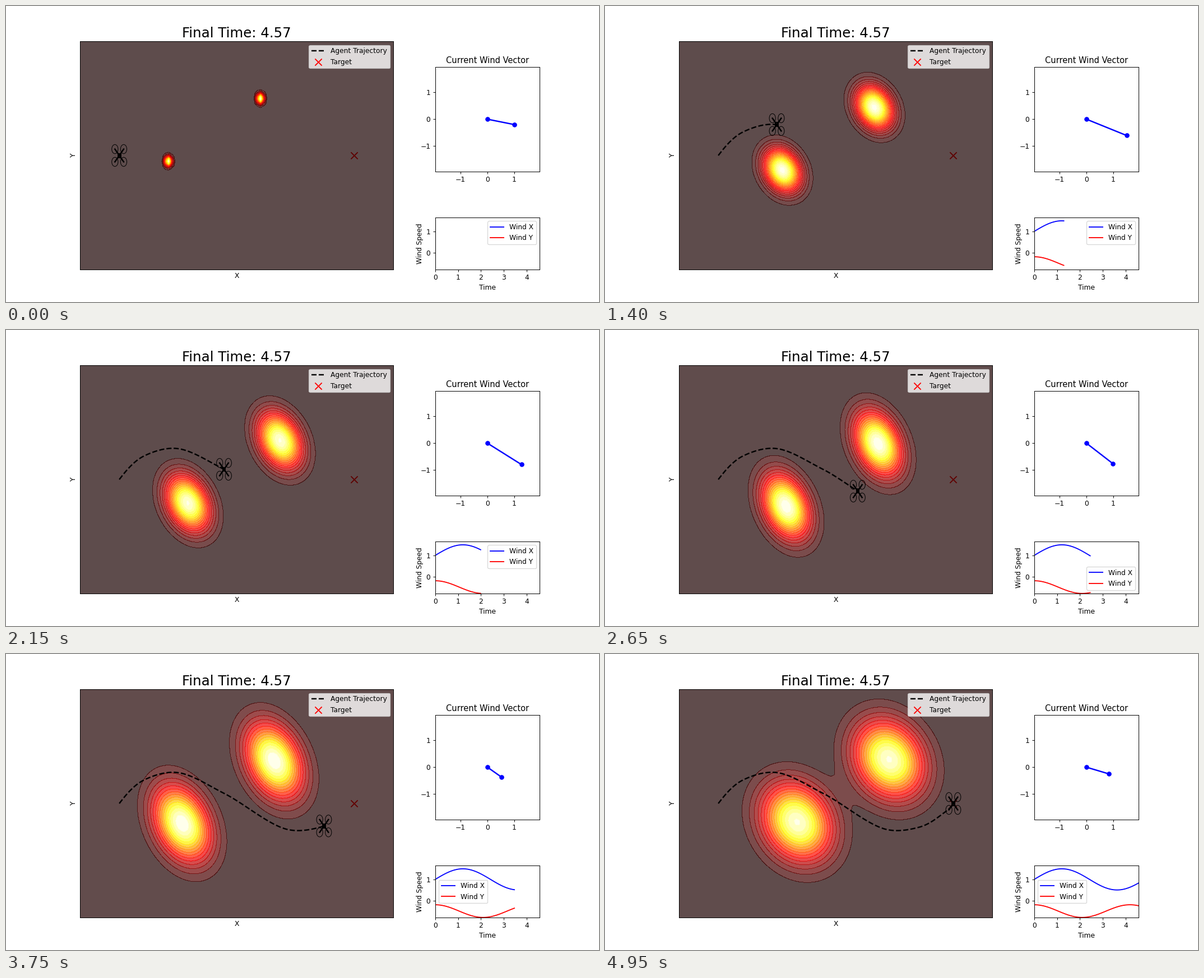
Write a matplotlib script that moves like this. It is 1058 by 529 pixels and loops after 5 s.

```python
import numpy as np
import matplotlib.pyplot as plt
from matplotlib.animation import FuncAnimation
from matplotlib.patches import Circle, Rectangle

plt.rcParams["font.family"] = "DejaVu Sans"

FRAMES, INTERVAL, DPI = 100, 50, 88
FINAL_TIME = 4.57
TIMES = np.linspace(0, FINAL_TIME, FRAMES)
TARGET = (30, 0)
SOURCES = [(6.25, -0.5), (18.0, 5.0)]
ARM, ROTOR, BODY = 0.56, 0.4, 0.34


def wind(t):
    return 1 + 0.5 * np.sin(1.3 * t), -0.5 + 0.3 * np.cos(1.5 * t)


def hermite(t, knots, values, v_start):
    """Smooth curve through the knots with a given starting velocity."""
    knots, values = np.array(knots), np.array(values)
    speed = np.gradient(values, knots, edge_order=2)
    speed[0] = v_start
    i = np.clip(np.searchsorted(knots, t, side="right") - 1, 0, len(knots) - 2)
    h = knots[i + 1] - knots[i]
    s = (t - knots[i]) / h
    return ((1 + 2 * s) * (1 - s) ** 2 * values[i] + s * (1 - s) ** 2 * h * speed[i]
            + s**2 * (3 - 2 * s) * values[i + 1] - s**2 * (1 - s) * h * speed[i + 1])


def density(t):
    """Two puffs carried by the wind, spreading twice as fast along it."""
    wx, wy = wind(t)
    norm = np.hypot(wx, wy)
    c, s = wx / norm, wy / norm
    var_along, var_cross = 0.1 + 2 * t, 0.1 + t
    total = np.zeros_like(GX)
    for x0, y0 in SOURCES:
        dx, dy = GX - x0 - wx * t, GY - y0 - wy * t
        along, cross = c * dx + s * dy, c * dy - s * dx
        total += np.exp(-0.5 * (along**2 / var_along + cross**2 / var_cross))
    return total / (2 * np.pi * np.sqrt(var_along * var_cross))


GX, GY = np.meshgrid(np.linspace(-5, 35, 100), np.linspace(-10, 10, 100))
WX, WY = wind(TIMES)
PATH_X = hermite(TIMES, [0, 0.692, 1.2925, 1.985, 2.862, 3.97, FINAL_TIME],
                 [0, 3.18, 7.47, 13.37, 21.6, 28.8, 30], 3.1)
PATH_Y = hermite(TIMES, [0, 0.692, 1.2925, 1.985, 2.862, 3.39, 3.97, FINAL_TIME],
                 [0, 2.07, 2.71, 0.89, -2.3, -2.08, -0.825, 0], 2.75)

fig = plt.figure(figsize=(1058 / DPI, 529 / DPI), dpi=DPI, facecolor="white")
grid = fig.add_gridspec(2, 2, width_ratios=[3, 1], height_ratios=[3, 1])

# Main map
ax = fig.add_subplot(grid[:, 0])
ax.set(xlim=(-5, 35), ylim=(-10, 10), xticks=[], yticks=[], xlabel="X", ylabel="Y")
ax.set_title(f"Final Time: {FINAL_TIME}", fontsize=20)
trail, = ax.plot([], [], "k--", lw=2, label="Agent Trajectory")
ax.scatter(*TARGET, s=100, c="red", marker="x", zorder=0.9, label="Target")
ax.legend(loc="upper right")

# Quadrotor
arms = [ax.plot([], [], "k-", lw=2, zorder=3)[0] for _ in range(2)]
rotors = [ax.add_patch(Circle((0, 0), ROTOR, fill=False, lw=0.8, zorder=3))
          for _ in range(4)]
body = ax.add_patch(Rectangle((0, 0), BODY, BODY, fill=False, lw=1.5, zorder=3))

# Wind vector
ax_vec = fig.add_subplot(grid[0, 1])
reach = 1.2 * np.hypot(WX, WY).max()
ax_vec.set(xlim=(-reach, reach), ylim=(-reach, reach), xticks=[-1, 0, 1],
           yticks=[-1, 0, 1], aspect="equal", title="Current Wind Vector")
vector, = ax_vec.plot([], [], "bo-", lw=2)

# Wind history
ax_hist = fig.add_subplot(grid[1, 1])
ax_hist.set(xlim=(0, FINAL_TIME), ylim=(-0.8, 1.65), xticks=range(5), yticks=[0, 1],
            xlabel="Time", ylabel="Wind Speed")
hist_x, = ax_hist.plot([], [], "b", label="Wind X")
hist_y, = ax_hist.plot([], [], "r", label="Wind Y")
ax_hist.legend(loc="best")

cloud = None


def place_drone(x, y):
    for arm, sign in zip(arms, (1, -1)):
        arm.set_data([x - ARM, x + ARM], [y - sign * ARM, y + sign * ARM])
    corners = [(i, j) for i in (-ARM, ARM) for j in (-ARM, ARM)]
    for rotor, (dx, dy) in zip(rotors, corners):
        rotor.center = (x + dx, y + dy)
    body.set_xy((x - BODY / 2, y - BODY / 2))


def update(k):
    global cloud
    if cloud is not None:
        cloud.remove()
    cloud = ax.contourf(GX, GY, density(TIMES[k]), levels=20, cmap="hot",
                        alpha=0.7, zorder=1)
    shown = slice(0, k + 1)
    trail.set_data(PATH_X[shown], PATH_Y[shown])
    place_drone(PATH_X[k], PATH_Y[k])
    vector.set_data([0, WX[k]], [0, WY[k]])
    hist_x.set_data(TIMES[shown], WX[shown])
    hist_y.set_data(TIMES[shown], WY[shown])
    return []


anim = FuncAnimation(fig, update, frames=FRAMES, interval=INTERVAL,
                     init_func=lambda: [], repeat=True, repeat_delay=0, blit=False)
plt.show()
```
